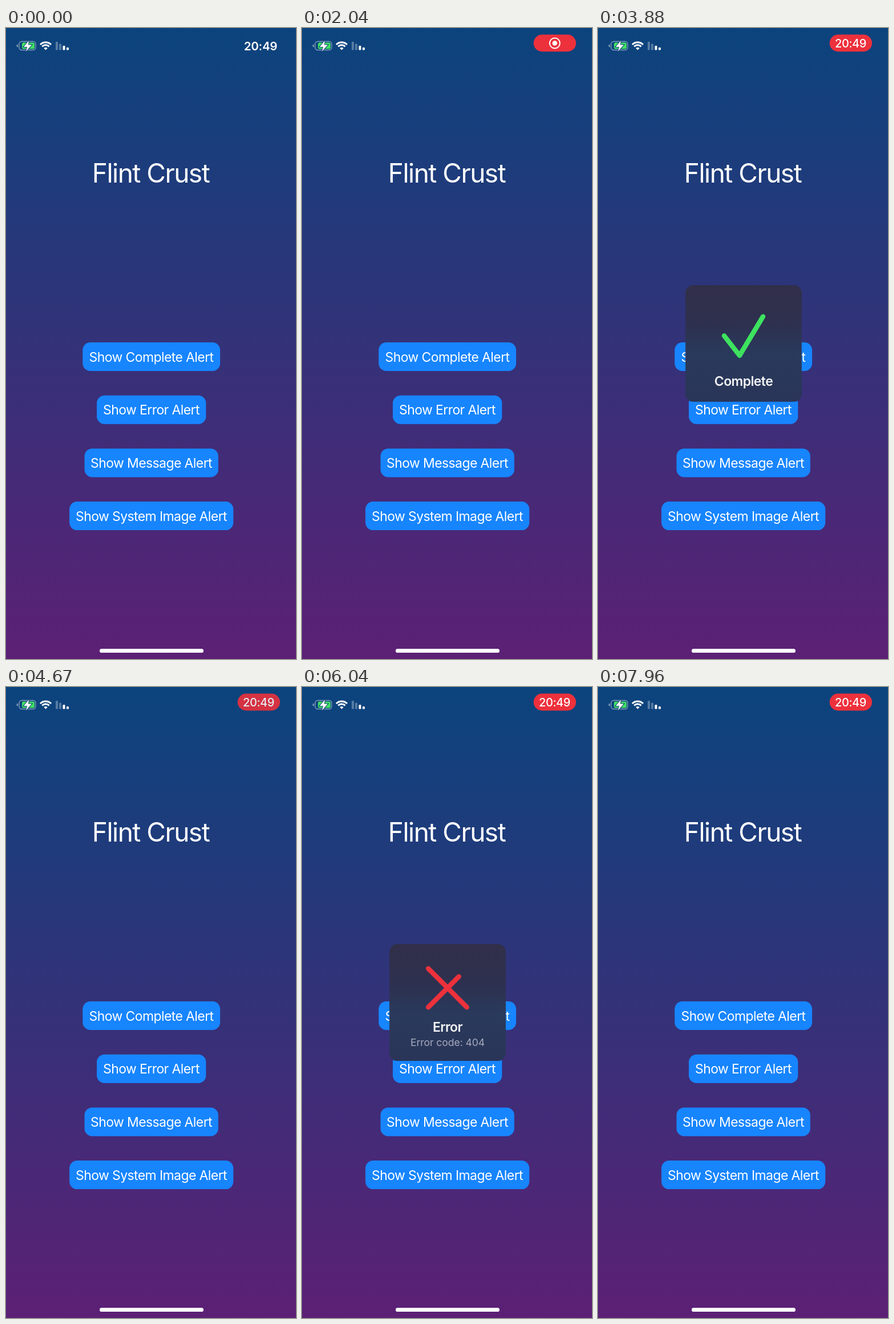
These frames come from a looping animation (508x1102 px, 8 s). An HTML page:

```html
<!DOCTYPE html>
<html lang="en">
<head>
<meta charset="utf-8">
<style>
  html, body { margin: 0; width: 100%; height: 100%; overflow: hidden; background: #33327a; }
  svg { display: block; width: 508px; height: 1102px; }
  text { font: 23px Inter, sans-serif; letter-spacing: -.026em; text-anchor: middle; fill: #fff; }
  text.title { font-size: 46px; letter-spacing: -.033em; }
  text.strong { font-weight: 600; fill: #f4f4f6; }
  text.sub { font-size: 17.6px; letter-spacing: -.005em; fill: #a7aabd; }
  text.clock { font-size: 20.5px; font-weight: 600; letter-spacing: -.01em; }
  text.pill { font-size: 20px; font-weight: 500; letter-spacing: -.02em; }
  .mark { fill: none; stroke-width: 8.5; stroke-linecap: round; stroke-linejoin: round; }
</style>
</head>
<body>
<svg viewBox="0 0 508 1102">
  <defs>
    <linearGradient id="sky" x2="0" y2="1">
      <stop stop-color="#0b447d"/><stop offset="1" stop-color="#5c2075"/>
    </linearGradient>
    <linearGradient id="glass" x2="0" y2="1">
      <stop stop-color="#312f49"/><stop offset=".33" stop-color="#2e304f"/>
      <stop offset=".6" stop-color="#293a5c"/><stop offset="1" stop-color="#2a3558"/>
    </linearGradient>
  </defs>
  <rect width="508" height="1102" fill="url(#sky)"/>

  <!-- status bar -->
  <path d="M21 28.5v5a2.5 2.5 0 0 1 0-5z" fill="#7f9cba"/>
  <rect x="23" y="23.5" width="29" height="15" rx="4.5" fill="none" stroke="#7f9cba" stroke-width="1.4"/>
  <rect x="28" y="25.5" width="22" height="11" rx="2.5" fill="#3fe062"/>
  <path d="M40 22 31 33h6l-2 8 10-11.5h-6z" fill="#fff" stroke="#10437d" stroke-width="2" paint-order="stroke"/>
  <g fill="none" stroke="#fff" stroke-width="3">
    <path d="M60 29a13.4 13.4 0 0 1 19 0M63.4 32.4a8.6 8.6 0 0 1 12.2 0"/>
  </g>
  <path d="M69.5 38.5l-3.25-3.25a4.6 4.6 0 0 1 6.5 0z" fill="#fff"/>
  <g fill="#fff">
    <rect x="87" y="24" width="4" height="14.5" rx="1" opacity=".3"/>
    <rect x="93" y="27.5" width="4" height="11" rx="1" opacity=".3"/>
    <rect x="99.5" y="31" width="4" height="7.5" rx="1"/>
    <rect x="106" y="34" width="4" height="4.5" rx="1"/>
  </g>
  <text id="clock" class="clock" x="446" y="38.5">20:49</text>
  <g id="pill">
    <rect x="405.7" y="11.6" width="74.3" height="29.6" rx="14.8" fill="#ed313c"/>
    <g id="rec">
      <circle cx="442.8" cy="26.5" r="9" fill="none" stroke="#fff" stroke-width="2"/>
      <circle cx="442.8" cy="26.5" r="4.3" fill="#fff"/>
    </g>
    <text id="pillTime" class="pill" x="442.5" y="33.6">20:49</text>
  </g>

  <text class="title" x="253.5" y="270">Flint Crust</text>
  <g id="buttons"></g>
  <g id="toasts"></g>
  <rect x="164" y="1084.3" width="182" height="6.8" rx="3.4" fill="#fff"/>
</svg>
<script>
const LOOP = 8000, STAY = 2000;
const $ = id => document.getElementById(id);
const clamp = v => Math.min(1, Math.max(0, v));
const ramp = (t, from, to) => clamp((t - from) / (to - from));

// Step response of a spring: response 0.55 s, damping 0.825.
function spring(ms) {
  if (ms <= 0) return 0;
  const w = 2 * Math.PI / 0.55, z = 0.825, q = Math.sqrt(1 - z * z), x = w * ms / 1000;
  return 1 - Math.exp(-z * x) * (Math.cos(q * x) + z / q * Math.sin(q * x));
}

const buttons = [
  ['Show Complete Alert', 240.8],
  ['Show Error Alert', 191.3],
  ['Show Message Alert', 234.3],
  ['Show System Image Alert', 287.2],
];
$('buttons').innerHTML = buttons.map(([label, w], i) => {
  const y = 549 + i * 92.7;
  return `<rect x="${254.7 - w / 2}" y="${y}" width="${w}" height="50" rx="13.5" fill="#1785fe"/>
    <text x="254.5" y="${y + 33.6}">${label}</text>`;
}).join('');
const labels = $('buttons').querySelectorAll('text');

const toasts = [
  { start: 2245, color: '#3de35f', strokes: ['M221 537.5L248 572L289 504'],
    text: '<text class="strong" x="255" y="625.5">Complete</text>' },
  { start: 5435, color: '#ec313c', strokes: ['M221.3 491.7L288.7 559.3', 'M221.3 559.3L288.7 491.7'],
    text: '<text class="strong" x="255" y="602">Error</text><text class="sub" x="255" y="626.7">Error code: 404</text>' },
];
$('toasts').innerHTML = toasts.map(a => `<g>
  <rect x="153.2" y="449.2" width="203.6" height="203.6" rx="13.5" fill="url(#glass)"/>
  ${a.strokes.map(d => `<path class="mark" pathLength="1" stroke="${a.color}" d="${d}"/>`).join('')}
  ${a.text}</g>`).join('');
toasts.forEach((a, i) => {
  a.group = $('toasts').children[i];
  a.marks = a.group.querySelectorAll('.mark');
  a.label = labels[i];
});

function drawToast(a, t) {
  const age = t - a.start;
  const shown = age < STAY ? spring(age) : 1 - spring(age - STAY);
  const scale = 0.8 + 0.2 * shown;
  a.group.setAttribute('opacity', clamp(shown));
  a.group.setAttribute('transform', `translate(255 551) scale(${scale}) translate(-255 -551)`);
  const drawn = clamp(spring((age - 250) * 0.75)) * a.marks.length;
  a.marks.forEach((m, i) => {
    const part = clamp(drawn - i);
    m.setAttribute('stroke-dasharray', `${part} 2`);
    m.setAttribute('visibility', part > 0.001 ? 'visible' : 'hidden');
  });
  // The label dims while touched and recovers after release.
  a.label.setAttribute('opacity', age < -100 ? 1 : 0.3 + 0.7 * ramp(age, 0, 250));
}

function draw(t) {
  const on = ramp(t, 100, 400), swap = ramp(t, 3000, 3250);
  $('clock').setAttribute('opacity', 1 - on);
  $('pill').setAttribute('opacity', on * (0.93 + 0.07 * Math.cos(t * Math.PI / 1000)));
  $('rec').setAttribute('opacity', 1 - swap);
  $('pillTime').setAttribute('opacity', swap);
  toasts.forEach(a => drawToast(a, t));
}

const begin = performance.now();
function tick() {
  draw((performance.now() - begin) % LOOP);
  requestAnimationFrame(tick);
}
draw(0);
requestAnimationFrame(tick);
</script>
</body>
</html>
```
